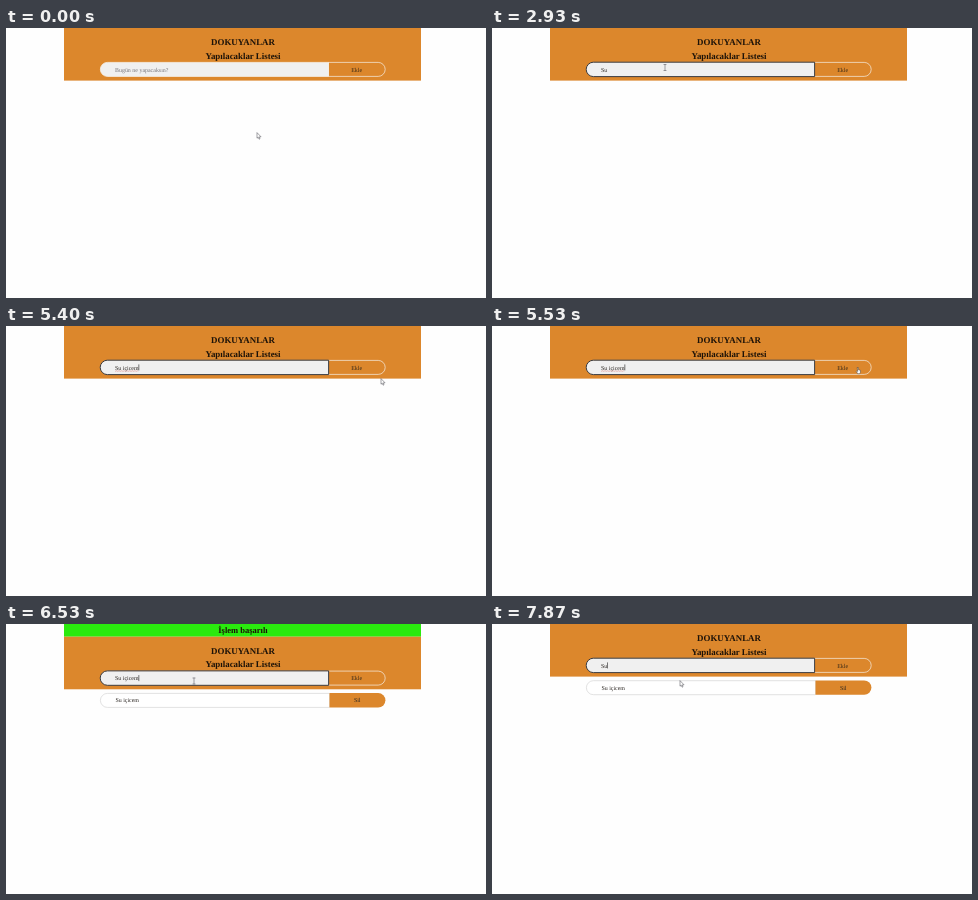
Recreate the animation shown at these times as an HTML page. Size 480 by 270 pixels, loop 8000 ms.

```html
<!DOCTYPE html>
<html lang="tr">
<head>
<meta charset="utf-8">
<title>Yapılacaklar Listesi</title>
<style>
  html, body { margin: 0; width: 100%; height: 100%; overflow: hidden; background: #fefefe; }
  svg { display: block; width: 480px; height: 270px; }
  text { font-family: "Liberation Serif", "Times New Roman", serif; font-size: 5.95px; fill: #2b2622; white-space: pre; text-rendering: geometricPrecision; }
  .mid { text-anchor: middle; }
  .head { font-weight: bold; font-size: 8.9px; fill: #1c1208; }
  .orange { fill: #dc872c; }
  .cursor path { stroke-linejoin: round; stroke-linecap: round; }
</style>
</head>
<body>
<svg viewBox="0 0 480 270">
  <g id="banner">
    <rect x="58" width="357" height="12.7" fill="#2aea0e"/>
    <text class="head mid" x="237" y="9" style="font-size:8.5px">İşlem başarılı</text>
  </g>
  <g id="page">
    <rect class="orange" x="58" width="357" height="52.6"/>
    <text class="head mid" x="237" y="17">DOKUYANLAR</text>
    <text class="head mid" x="237" y="30.5">Yapılacaklar Listesi</text>

    <path d="M322.5 34.4H372.2a7 7 0 0 1 0 14H322.5z" class="orange" stroke="#f3e3d0" stroke-width=".8"/>
    <text class="mid" x="350.6" y="43.6" style="fill:#3a2a18">Ekle</text>
    <path id="field" d="M322.5 34.4H101.4a7 7 0 0 0 0 14H322.5z" fill="#f0f0f0" stroke="#f7f1ea" stroke-width=".8"/>
    <path id="ring" d="M322.6 34.2H101.4a7.2 7.2 0 0 0 0 14.4H322.6z" fill="none" stroke="#25282e" stroke-width=".9"/>
    <text id="hint" x="109" y="43.5" style="fill:#77757a">Bugün ne yapacaksın?</text>
    <text id="typed" x="109" y="43.5"></text>
    <path id="wave" fill="none" stroke="#d9534a" stroke-width=".45" opacity=".8"/>
    <rect id="caret" y="38.4" width=".6" height="6" fill="#222"/>

    <g id="item">
      <path d="M323.5 56.7H101.4a7 7 0 0 0 0 14H323.5z" fill="#fff" stroke="#cfcfcf" stroke-width=".6"/>
      <path d="M323.5 56.4H372.2a7.2 7.2 0 0 1 0 14.4H323.5z" class="orange"/>
      <text x="109.4" y="65.8">Su içicem</text>
      <text class="mid" x="351.2" y="65.8">Sil</text>
    </g>
  </g>
  <g id="arrow" class="cursor">
    <path d="M0 0V5.2L1.2 4.2L2.1 6.2L3 5.8L2.1 3.9H3.7z" fill="#fff" stroke="#55555c" stroke-width=".55"/>
  </g>
  <g id="beam" class="cursor">
    <path d="M-1.1 -3H1.1M0 -3V3M-1.1 3H1.1" fill="none" stroke="#66666c" stroke-width=".6"/>
  </g>
  <g id="hand" class="cursor">
    <path d="M-.5 0H.4V2.2L2.4 2.8V4.8L1.8 6.2H-.4L-1.7 3.8L-1.2 3.2L-.5 3.8z" fill="#fff" stroke="#4a4038" stroke-width=".55"/>
  </g>
</svg>
<script>
  const LOOP = 8000, STEPS_PER_SEC = 15, BLINK = 8, SHIFT = 12.7, LEFT = 109;
  const el = id => document.getElementById(id);

  // [step, text]: each edit, including focus, restarts the caret blink
  const edits = [
    [18, ""], [28, "S"], [34, "Su"], [36, "Su "], [45, "Su i"], [48, "Su iç"], [50, "Su içi"],
    [61, "Su içic"], [62, "Su içice"], [63, "Su içicem"], [93, "Su içicem"],
    [107, "Su içice"], [109, "Su içic"], [110, "Su içi"], [113, "Su iç"],
    [115, "Su i"], [116, "Su "], [118, "Su"]
  ];

  // [step, x, y, pointer]
  const moves = [
    [0, 251, 105, "arrow"], [6, 251, 105, "arrow"], [9, 226, 78, "arrow"], [11, 180, 34, "arrow"],
    [13, 153, 11, "arrow"], [15, 171, 27, "arrow"], [17, 171, 27, "arrow"], [18, 173, 39.5, "beam"],
    [75, 173, 39.5, "beam"], [78, 265, 43, "beam"], [79, 308, 47, "arrow"], [81, 375, 53, "arrow"],
    [83, 366, 41.5, "hand"], [84, 366, 41.5, "hand"], [86, 270, 55, "arrow"], [88, 192, 65, "arrow"],
    [90, 192, 65, "arrow"], [92, 189, 59, "beam"], [94, 188, 57, "beam"], [99, 188, 57, "arrow"]
  ];

  const latest = (table, step) => table.filter(row => row[0] <= step).pop();
  const within = (step, from, to) => step >= from && step < to;
  const show = (id, on) => el(id).setAttribute("visibility", on ? "visible" : "hidden");

  function pointerAt(step) {
    const a = latest(moves, step);
    const b = moves[moves.indexOf(a) + 1] || a;
    const k = a === b ? 0 : (step - a[0]) / (b[0] - a[0]);
    return { x: a[1] + (b[1] - a[1]) * k, y: a[2] + (b[2] - a[2]) * k, kind: a[3] };
  }

  function squiggle(width) {
    let d = `M${LEFT} 44.8`;
    for (let x = 0.8, i = 0; x <= width; x += 0.8, i++) d += `L${LEFT + x} ${i % 2 ? 44.8 : 45.3}`;
    return d;
  }

  function draw(step) {
    const banner = within(step, 84, 99);
    const focused = within(step, 18, 84) || step >= 93;
    const [editStep, value] = latest(edits, step) || [0, ""];

    show("banner", banner);
    el("page").setAttribute("transform", `translate(0 ${banner ? SHIFT : 0})`);
    show("item", step >= 84);
    show("ring", focused);
    el("ring").setAttribute("opacity", step === 18 ? 0.85 : 1);
    show("hint", !value);
    el("typed").textContent = value;

    const width = value ? el("typed").getComputedTextLength() : 0;
    el("caret").setAttribute("x", LEFT + width);
    show("caret", focused && Math.floor((step - editStep) / BLINK) % 2 === 0);

    show("wave", within(step, 45, 84));
    el("wave").setAttribute("d", squiggle(step < 77 ? 6.4 : width));

    const p = pointerAt(step);
    for (const kind of ["arrow", "beam", "hand"]) {
      show(kind, p.kind === kind);
      el(kind).setAttribute("transform", `translate(${p.x} ${p.y})`);
    }
  }

  function tick() {
    const t = performance.now() % LOOP;
    draw(Math.floor(t * STEPS_PER_SEC / 1000 + 0.1));
    requestAnimationFrame(tick);
  }
  tick();
</script>
</body>
</html>
```
